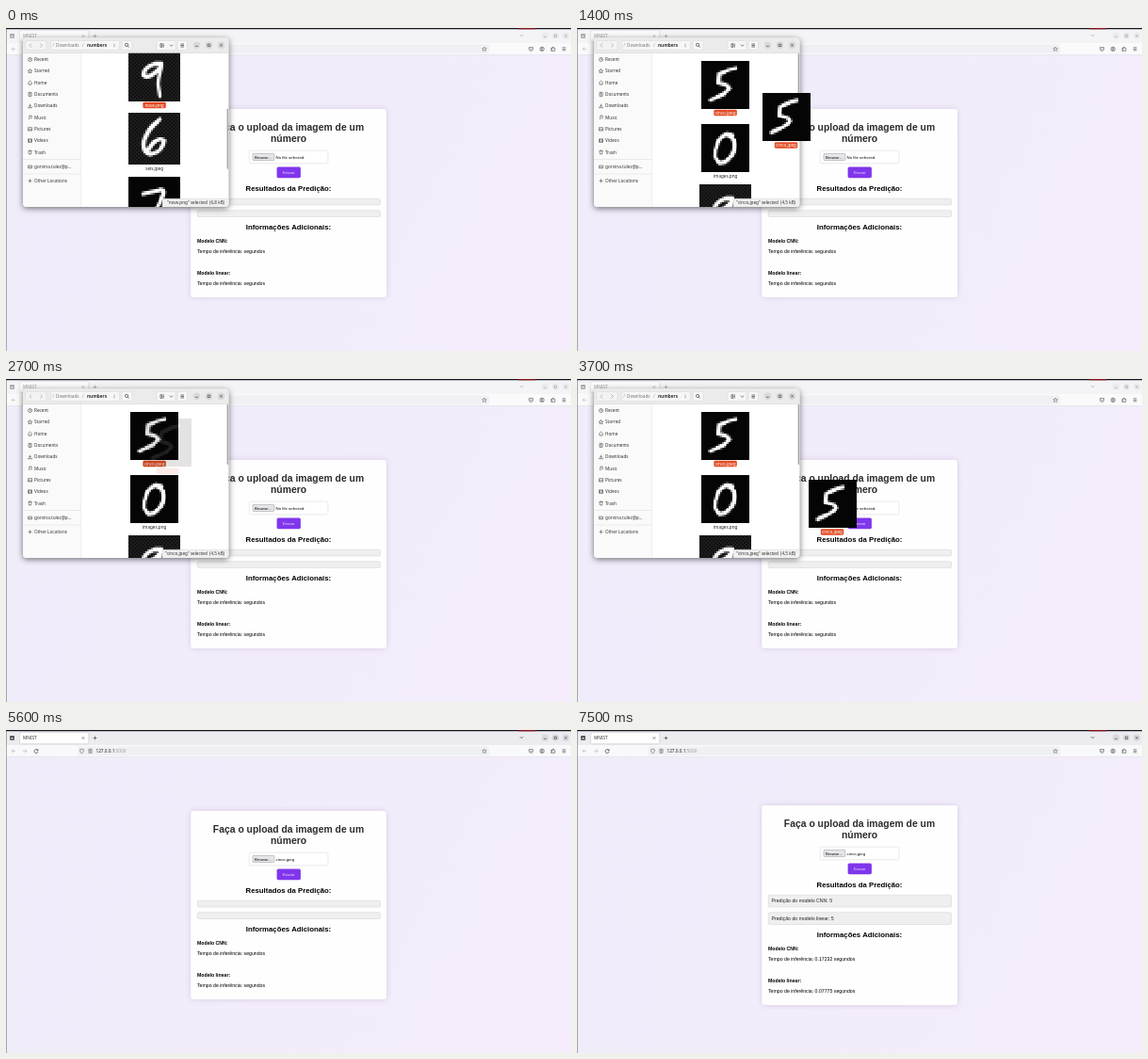
Animation of 600 by 343 pixels, one loop 8000 ms. Source, as an HTML page with a canvas:

```html
<!DOCTYPE html>
<html lang="pt">
<head>
<meta charset="utf-8">
<title>MNIST</title>
<style>
  html, body { margin: 0; width: 100%; height: 100%; overflow: hidden; background: #f2ecfa; }
  canvas { display: block; width: 600px; height: 343px; }
</style>
</head>
<body>
<canvas id="stage" width="600" height="343"></canvas>
<script>
const ctx = document.getElementById('stage').getContext('2d');
const LOOP = 8000, STEP = 100;
const WEB = '"Liberation Sans", Arial, sans-serif';
const UI = '"Noto Sans", "Open Sans", sans-serif';

function box(x, y, w, h, fill, radius = 0, border) {
  ctx.beginPath();
  ctx.roundRect(x, y, w, h, radius);
  if (fill) { ctx.fillStyle = fill; ctx.fill(); }
  if (border) { ctx.strokeStyle = border; ctx.lineWidth = 0.5; ctx.stroke(); }
}

function shadowBox(x, y, w, h, fill, radius, color, blur, dy = 0) {
  ctx.save();
  ctx.shadowColor = color;
  ctx.shadowBlur = blur;
  ctx.shadowOffsetY = dy;
  box(x, y, w, h, fill, radius);
  ctx.restore();
}

function text(str, x, y, size, { color = '#000', font = WEB, weight = 400, align = 'left' } = {}) {
  ctx.font = `${weight} ${size}px ${font}`;
  ctx.fillStyle = color;
  ctx.textAlign = align;
  ctx.fillText(str, x, y);
}

// Strokes an SVG path whose origin is placed at (x, y)
function icon(path, x, y, color = '#444', width = 0.7) {
  ctx.save();
  ctx.translate(x, y);
  ctx.strokeStyle = color;
  ctx.lineWidth = width;
  ctx.stroke(new Path2D(path));
  ctx.restore();
}

const ICONS = {
  left: 'M1-2L-1 0L1 2', right: 'M-1-2L1 0L-1 2', down: 'M-1.6-.8L0 .8L1.6-.8',
  cross: 'M-1.3-1.3L1.3 1.3M1.3-1.3L-1.3 1.3', plus: 'M-2 0H2M0-2V2',
  minus: 'M-1.4 1H1.4', square: 'M-1.2-1.2H1.2V1.2H-1.2Z', menu: 'M-1.8-1.5H1.8M-1.8 0H1.8M-1.8 1.5H1.8',
  search: 'M1.2-.4A1.6 1.6 0 1 1-2-.4A1.6 1.6 0 1 1 1.2-.4M.7.8L2.2 2.3',
  dots: 'M0-1.8V-1.1M0-.4V.3M0 1V1.7',
  list: 'M-2-1.8H-.3V1.8H-2ZM.5-1.5H2M.5 0H2M.5 1.5H2',
  clock: 'M2 0A2 2 0 1 1-2 0A2 2 0 1 1 2 0M0-1.2V0H1',
  star: 'M0-2.3L.7-.7L2.3-.6L1.1.5L1.5 2.1L0 1.2L-1.5 2.1L-1.1.5L-2.3-.6L-.7-.7Z',
  home: 'M-2.2 0L0-2L2.2 0M-1.5 0V2H1.5V0', page: 'M-1.5-2H1.5V2H-1.5ZM-.7-.7H.7M-.7.5H.7',
  save: 'M0-2V.8M-1.2-.4L0 .8L1.2-.4M-2 1V2H2V1', music: 'M-.7 1.3V-2H1.6V.8M-1.6 1.5H-.6M.6 1H1.6',
  image: 'M-2-1.6H2V1.7H-2ZM-1.8 1.3L-.3-.2L1.8 1.3', film: 'M-2-1.7H2V1.7H-2ZM-1-1.7V1.7M1-1.7V1.7',
  trash: 'M-2-1.4H2M-1.4-1.4L-1.1 2H1.1L1.4-1.4M-.6-2.1H.6', drive: 'M-2-1.2H2V1.5H-2ZM-1 .5H1',
  shield: 'M0-2.2L1.8-1.5V0Q1.8 1.6 0 2.3Q-1.8 1.6-1.8 0V-1.5Z',
  reload: 'M1.8-.7A2 2 0 1 0 2 .6M2-2V-.5H.5',
  pocket: 'M-2-1.7H2V0A2 2 0 0 1-2 0ZM-.9-.4L0 .5L.9-.4',
  user: 'M2.2 0A2.2 2.2 0 1 1-2.2 0A2.2 2.2 0 1 1 2.2 0M.7-.6A.7.7 0 1 1-.7-.6A.7.7 0 1 1 .7-.6M-1.4 1.5Q0 0 1.4 1.5',
  puzzle: 'M-2-1H-.6V-2H.6V-1H2V2H-2V.8H-1V-.1H-2Z'
};
const glyph = (name, x, y, color, width) => icon(ICONS[name], x, y, color, width);

// Handwritten digits, drawn on a 28 x 28 cell raster
function digit(path, noisy) {
  const raster = document.createElement('canvas');
  raster.width = raster.height = 28;
  const g = raster.getContext('2d');
  g.fillStyle = noisy ? '#111' : '#050505';
  g.fillRect(0, 0, 28, 28);
  if (noisy) {
    g.fillStyle = '#1e1e1e';
    for (let i = 0; i < 28 * 28; i++) {
      const x = i % 28, y = i / 28 | 0;
      if ((x + y) % 2) g.fillRect(x, y, 1, 1);
    }
  }
  g.strokeStyle = '#fff';
  g.lineWidth = 2.3;
  g.lineCap = g.lineJoin = 'round';
  g.stroke(new Path2D(path));
  return raster;
}

const files = [
  { name: 'cinco.jpeg', size: 51, image: digit('M20 4.5L16 5.5L10.5 8L10 13L15 14.5L16.5 16.5L13 19.5L5.5 23') },
  { name: 'images.png', size: 51, image: digit('M18 6.5Q13 4 9.5 11Q6 20 10.5 22.5Q16 23 19 15.5Q20.5 8 15 6') },
  { name: 'nove.png', size: 55, image: digit('M18 8L14 8Q8 10 8 14Q11 17 18 9Q16 16 16 19L17 25', true) },
  { name: 'seis.jpeg', size: 55, image: digit('M17 3.5Q9 9 8 17Q8 22 12 22.5Q19 21 19.5 15Q15 12 10 21', true) },
  { name: 'sete.png', size: 55, image: digit('M8 9.5L17 7.5Q20 7 19 10L13 22') }
];

function fileItem({ name, size, image }, cx, labelY, selected) {
  ctx.imageSmoothingEnabled = false;
  ctx.drawImage(image, cx - size / 2, labelY - 4.5 - size, size, size);
  if (selected) box(cx - 12.2, labelY - 3.2, 24.4, 6.4, '#e24a22', 1.4);
  text(name, cx, labelY + 1.5, 4.6, { font: UI, align: 'center', color: selected ? '#fff' : '#222' });
}

function browser(active) {
  const ink = active ? '#333' : '#999';
  box(0, 0, 600, 17, active ? '#ececf0' : '#f4f4f6');
  box(0, 16, 600, 12.5, active ? '#f9f9fb' : '#fafafb');
  box(0, 28, 600, 0.5, '#dcdce2');
  box(0, 0, 600, 1.3, '#17121c');
  box(544, 0, 18, 1.3, '#8c1420');
  shadowBox(15, 3, 72.5, 11.5, active ? '#fff' : '#fafafb', 1.5, 'rgba(0,0,0,.3)', 1.5);
  glyph('square', 6.5, 8.5, ink);
  icon('M-2-2H2V2H-2ZM-2-1H2', 6.5, 8.5, ink);
  text('MNIST', 18, 10.3, 4.7, { font: UI, color: ink });
  glyph('cross', 82, 8.5, ink, 0.5);
  glyph('plus', 94.5, 8.5, ink, 0.6);
  glyph('down', 547.5, 8, ink);
  ['minus', 'square', 'cross'].forEach((name, i) => {
    const x = 572.5 + i * 11;
    ctx.beginPath();
    ctx.arc(x, 8.3, 3.7, 0, 7);
    ctx.fillStyle = active ? '#d9d9de' : '#ebebee';
    ctx.fill();
    glyph(name, x, 8.3, ink, 0.6);
  });
  icon('M2 0H-2M0-2L-2 0L0 2', 8, 22.3, '#bbb');
  icon('M-2 0H2M0-2L2 0L0 2', 20, 22.3, '#bbb');
  glyph('reload', 32, 22.3, ink);
  box(76, 17.5, 437, 9.5, '#f0f0f4', 1.5);
  glyph('shield', 80.5, 22.3, '#555', 0.6);
  glyph('page', 89.5, 22.3, '#555', 0.6);
  text('127.0.0.1', 95.5, 24, 4.7, { font: UI, color: '#222' });
  text(':5000', 95.5 + ctx.measureText('127.0.0.1').width, 24, 4.7, { font: UI, color: '#999' });
  glyph('star', 508, 22.3, '#555', 0.5);
  ['pocket', 'user', 'puzzle', 'menu'].forEach((name, i) => glyph(name, 557.5 + i * 11.7, 22.3, '#444', 0.6));
}

function page(fileName, results, hover) {
  const bg = ctx.createLinearGradient(0, 28, 600, 343);
  bg.addColorStop(0, '#f0ecfa');
  bg.addColorStop(1, '#f4ecfb');
  ctx.fillStyle = bg;
  ctx.fillRect(0, 28, 600, 315);

  const shift = results ? 6 : 0;
  const up = y => y - shift, down = y => y + shift;
  const center = { weight: 700, align: 'center' };
  shadowBox(196.2, up(86), 207.8, 200 + 2 * shift, '#fdfefd', 3.2, 'rgba(60,40,100,.16)', 6);
  text('Faça o upload da imagem de um', 300, up(109), 10.39, { ...center, color: '#2b2b2b' });
  text('número', 300, up(121), 10.39, { ...center, color: '#2b2b2b' });

  box(258.3, up(130.2), 83.6, 13.6, '#fff', 1.6, '#d4d4d4');
  box(262, up(133.3), 22.8, 7.3, '#e6e6ea', 1, '#8f8f9d');
  text('Browse…', 273.4, up(138.5), 4.33, { align: 'center' });
  text(fileName, 286.6, up(138.5), 4.33);
  box(287.6, up(147.5), 25.3, 11.7, hover ? '#6f2bd8' : '#8036ec', 1.6);
  text('Enviar', 300.2, up(155), 4.33, { align: 'center', color: '#f1e8ff' });

  text('Resultados da Predição:', 300, up(172.8), 7.79, center);
  ['CNN', 'linear'].forEach((model, i) => {
    const y = i ? 193.7 : up(181.2);
    box(203.2, y, 194.4, 6.8 + shift, '#efefef', 1.5, '#d0d0d0');
    if (results) text(`Predição do modelo ${model}: 5`, 206.5, y + 8.2, 5.19, { color: '#222' });
  });
  text('Informações Adicionais:', 300, down(214.2), 7.79, center);
  ['0.17232 ', '0.07775 '].forEach((seconds, i) => {
    const y = down(227.5 + i * 34.3);
    text(`Modelo ${i ? 'linear' : 'CNN'}:`, 203, y, 5.19, { weight: 700 });
    text(`Tempo de inferência: ${results ? seconds : ''}segundos`, 203, y + 11.5, 5.19);
  });
}

const places = [
  ['clock', 'Recent'], ['star', 'Starred'], ['home', 'Home'], ['page', 'Documents'], ['save', 'Downloads'],
  ['music', 'Music'], ['image', 'Pictures'], ['film', 'Videos'], ['trash', 'Trash'],
  ['drive', 'gorvina.tulez@p...', 147.3], ['plus', 'Other Locations', 162.3]
];

function fileManager(scroll, selected) {
  const ui = { font: UI, color: '#333' };
  shadowBox(18, 10.5, 218.5, 179.5, '#fff', 4, 'rgba(0,0,0,.55)', 6, 1.5);
  ctx.save();
  ctx.beginPath();
  ctx.roundRect(18, 10.5, 218.5, 179.5, 4);
  ctx.clip();

  files.forEach((file, i) => fileItem(file, 157.6, 90 + i * 67.5 - scroll, file.name === selected));
  box(234.6, 27 + scroll * 0.41, 1.5, 64, '#a9a9a9', 0.7);
  box(18, 26, 61.5, 164, '#fafafa');
  box(79.3, 26, 0.4, 164, '#dedede');

  box(18, 10.5, 218.5, 16, '#ebebeb');
  box(18, 26.3, 218.5, 0.4, '#cfcfcf');
  box(20.5, 13.5, 22.5, 10, '#f3f3f3', 1.5, '#d6d6d6');
  glyph('left', 26, 18.5, '#999');
  glyph('right', 37.5, 18.5, '#999');
  box(47.5, 13.5, 73, 10, '#f6f6f6', 1.5, '#d6d6d6');
  text('/', 49.3, 20.2, 4.7, { ...ui, color: '#999' });
  text('Downloads', 53, 20.2, 4.7, { ...ui, color: '#777' });
  text('/', 81, 20.2, 4.7, { ...ui, color: '#999' });
  text('numbers', 86, 20.2, 4.7, { ...ui, weight: 700 });
  glyph('dots', 115, 18.5);
  box(123, 13.5, 11, 10, '#f6f6f6', 1.5, '#d6d6d6');
  glyph('search', 128.5, 18.3);
  box(160, 13.5, 20, 10, '#f6f6f6', 1.5, '#d6d6d6');
  glyph('list', 166, 18.5);
  glyph('down', 175.5, 18.5);
  box(182, 13.5, 10.5, 10, '#f6f6f6', 1.5, '#d6d6d6');
  glyph('menu', 187.2, 18.5);
  ['minus', 'square', 'cross'].forEach((name, i) => {
    const x = 202.5 + i * 13;
    ctx.beginPath();
    ctx.arc(x, 18.3, 3.7, 0, 7);
    ctx.fillStyle = '#d8d8d8';
    ctx.fill();
    glyph(name, x, 18.3);
  });

  places.forEach(([name, label, y = 33.5 + places.findIndex(p => p[1] === label) * 12.3]) => {
    glyph(name, 25.5, y, '#444', 0.6);
    text(label, 30, y + 1.6, 4.7, ui);
  });
  box(18, 139.6, 61.5, 0.4, '#dcdcdc');
  box(18, 154.8, 61.5, 0.4, '#dcdcdc');

  box(166, 181.3, 71, 9, '#f0f0f0', [2, 0, 0, 0], '#d2d2d2');
  const size = selected === 'nove.png' ? '6,8' : '4,5';
  text(`"${selected}" selected  (${size} kB)`, 232, 187.3, 4.6, { ...ui, align: 'right' });
  ctx.restore();
}

// Drag routes: [time, left, top] of the carried thumbnail
const HOME = [132.1, 34.5];
const drags = [
  [[1200, ...HOME], [1300, 165, 52], [1500, 228, 86], [1600, 244, 93], [1800, 245, 96], [2000, 252, 100], [2200, 259, 104], [2440, 259, 104]],
  [[3200, ...HOME], [3300, 170, 60], [3500, 246, 101], [3600, 250, 106], [3700, 245.5, 107], [4000, 247, 102.5], [4100, 259, 102.5], [4300, 259, 102.5]]
];

function along(route, t) {
  const i = route.findIndex(k => k[0] > t);
  const [a, b] = [route[i - 1], route[i]];
  const p = (t - a[0]) / (b[0] - a[0]);
  return [a[1] + (b[1] - a[1]) * p, a[2] + (b[2] - a[2]) * p];
}

function dragged(t) {
  const route = drags.find(r => t >= r[0][0] && t < r.at(-1)[0]);
  let x, y, alpha = 1;
  if (route) {
    [x, y] = along(route, t);
  } else if (t >= 2440 && t < 2940) {
    // A rejected drop glides home while fading out
    alpha = (1 - (t - 2440) / 500) ** 3;
    x = HOME[0] + (259 - HOME[0]) * alpha;
    y = HOME[1] + (104 - HOME[1]) * alpha;
  } else return;
  ctx.globalAlpha = alpha;
  fileItem(files[0], x + 25.5, y + 55.5, true);
  ctx.globalAlpha = 1;
}

function scrollAt(t) {
  if (t < 200) return 143;
  if (t < 300) return 95;
  if (t < 500) return 45;
  return t < 600 ? 19 : 0;
}

function draw(t) {
  const managerOpen = t < 5000;
  ctx.clearRect(0, 0, 600, 343);
  page(t < 4300 ? 'No file selected.' : 'cinco.jpeg', t >= 6500, t >= 5700 && t < 6500);
  browser(!managerOpen);
  box(0, 1.3, 0.6, 342, '#777');
  if (managerOpen) fileManager(scrollAt(t), t < 1100 ? 'nove.png' : 'cinco.jpeg');
  dragged(t);
}

const start = performance.now();
function tick() {
  const t = (performance.now() - start) % LOOP;
  draw(Math.floor(t / STEP) * STEP);
  requestAnimationFrame(tick);
}
tick();
</script>
</body>
</html>
```
